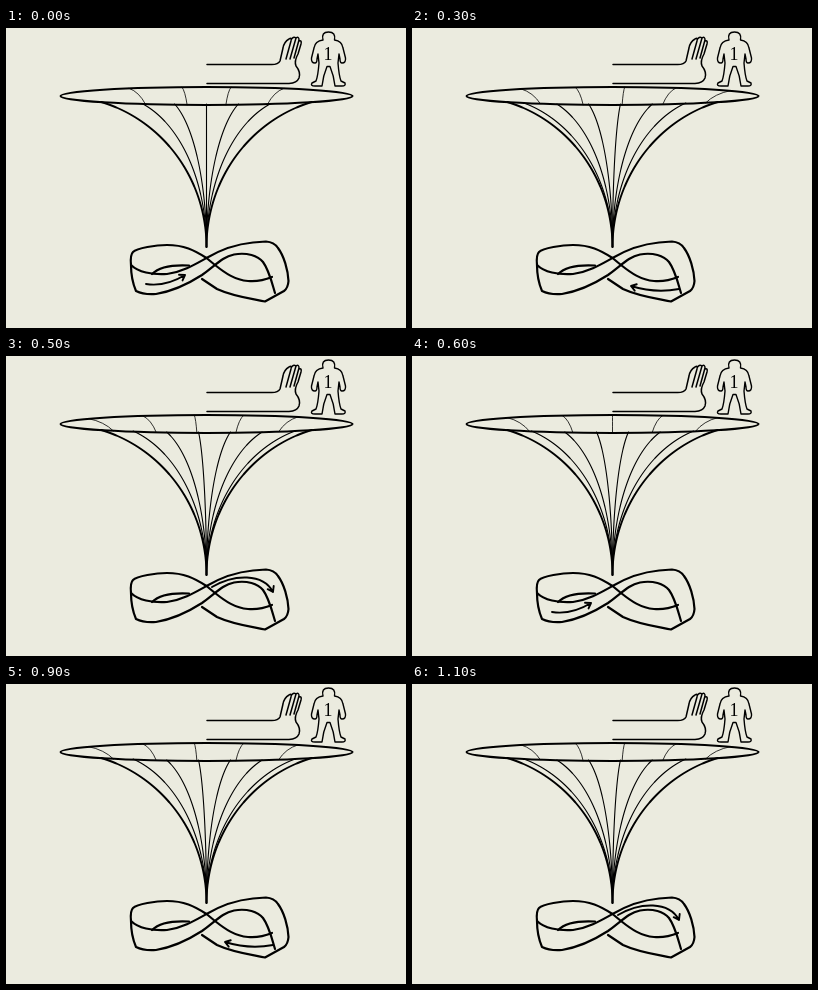
An HTML page with a canvas that plays this animation: 400 px wide and 300 px high, repeating every 1.2 s.

```html
<!DOCTYPE html>
<html lang="en">
<head>
<meta charset="utf-8">
<title>Funnel and band</title>
<style>
html, body { margin: 0; width: 100%; height: 100%; overflow: hidden; background: #ebebdf; }
canvas { display: block; }
</style>
</head>
<body>
<canvas id="stage" width="400" height="300"></canvas>
<script>
const ctx = document.getElementById('stage').getContext('2d');
const STEP = 100, LOOP = 1200;
const CX = 200.5, RIM_Y = 68, TIP_Y = 219, RX = 146, RY = 9;
const DEPTH = TIP_Y - RIM_Y;
const LINES = 13, GAP = Math.PI * 2 / LINES;

const band = [
  // left end and top, up to the crossing
  'M125 237Q124 227 127 224C131 220 150 217 161 217C178 217 188 222 200.5 230L209 237C219 245 229 252 242 253Q254 254 266 249',
  // upper edge of the front strand and the right end
  'M125 237C132 244 146 247 161 246C176 244 188 237 200.5 230C214 222 232 216 247 214.5L260 213.5Q268 214 272 220C278 228 282 242 282.5 253Q282 260 278 263L259 273.5C241 270 226 268 211 261L196 251',
  // lower edge of the front strand
  'M125 237C125 246 127 256 130 263Q138 267 150 266C168 263 182 256 196 247C210 237 216 229 228 226.5C241 224 252 228 257 234C263 242 266 255 269 265',
  'M146 246Q156 236 183 237.5'
].map(d => new Path2D(d));

const arm = new Path2D('M201 36.5L264 36.5Q272 37 274 33L277 20Q278 14 283 11Q286 9 285 13L280 31M285 12Q287 8 290 10L284 31M290 10Q293 8 293 12L288 30M293 13Q296 12 295 16L292 26Q288 33 290 38Q295 44 293 50Q291 55 283 55.5H201');

const person = new Path2D('M317 12Q315 4 322.5 4Q330 4 328.5 12Q336 13 337 20L339.5 30Q340 35 336 35Q334 35 334 31L333 26L332 35Q333 48 335 53L339 55Q340 58 336 58H329Q328 48 324 38.5H321Q317 48 316 58H309Q304 58 306 55L310 53Q312 48 313 35L312 26L311 31Q311 35 309 35Q305 35 305.5 30L308 20Q309 13 317 12Z');

// each arrow: start, two controls, tip
const arrows = [
  [140, 256, 153, 258, 166, 255, 179, 247],
  [166, 254, 184, 247, 196, 239, 210, 231],
  [193, 240, 205, 230, 220, 223, 238, 227],
  [267, 261, 251, 264, 235, 263, 219, 258],
  [181, 241, 167, 239, 154, 240, 143, 243],
  [206, 231, 228, 218, 257, 217, 267, 236]
];

function stroke(path, width) {
  ctx.lineWidth = width;
  ctx.stroke(path);
}

// half width of the funnel at height y
function halfWidth(y) {
  const v = (TIP_Y - y) / DEPTH;
  return RX * (1 - Math.sqrt(Math.max(0, 1 - v * v)));
}

// half height of the rim at x
function rimAt(x) {
  const u = (x - CX) / RX;
  return RY * Math.sqrt(Math.max(0, 1 - u * u));
}

function outerLine(s, width) {
  const p = new Path2D();
  let open = false;
  for (let y = 70; y <= TIP_Y; y++) {
    const x = CX + s * halfWidth(y);
    if (y < RIM_Y + rimAt(x) - 1) continue;
    if (open) p.lineTo(x, y);
    else p.moveTo(x, y);
    open = true;
  }
  stroke(p, width);
}

function innerLine(s) {
  const top = CX + s * RX, mid = CX + s * RX * 0.87, end = CX + s * RX * 0.79;
  const p = new Path2D();
  p.moveTo(top, RIM_Y - rimAt(top));
  p.quadraticCurveTo(mid, RIM_Y - rimAt(mid) + 4, end, RIM_Y + rimAt(end));
  stroke(p, 0.8);
}

function funnel(turn) {
  for (let i = 0; i < LINES; i++) {
    const a = i * GAP + turn, s = Math.sin(a), c = Math.cos(a);
    if (c < -0.4) innerLine(s / (1 + 0.45 * c * c));
    if (c > 0.2) outerLine(s / (1 + 0.5 * c), 1.1);
  }
  outerLine(-1, 1.9);
  outerLine(1, 1.9);
  const rim = new Path2D();
  rim.ellipse(CX, RIM_Y, RX, RY, 0, 0, Math.PI * 2);
  stroke(rim, 2);
}

function arrow([x0, y0, x1, y1, x2, y2, x, y]) {
  const a = Math.atan2(y - y2, x - x2);
  const p = new Path2D();
  p.moveTo(x0, y0);
  p.bezierCurveTo(x1, y1, x2, y2, x, y);
  const wing = d => [x - 6 * Math.cos(a + d), y - 6 * Math.sin(a + d)];
  p.moveTo(...wing(0.6));
  p.lineTo(x, y);
  p.lineTo(...wing(-0.6));
  stroke(p, 1.9);
}

function draw(now) {
  const n = Math.floor((now % LOOP) / STEP);
  ctx.fillStyle = '#ebebdf';
  ctx.fillRect(0, 0, 400, 300);
  ctx.strokeStyle = ctx.fillStyle = '#000';
  ctx.lineCap = ctx.lineJoin = 'round';
  stroke(arm, 1.5);
  stroke(person, 1.4);
  ctx.font = '18px "Liberation Serif", serif';
  ctx.textAlign = 'center';
  ctx.fillText('1', 322, 32);
  funnel(-n * GAP / 4);
  for (const p of band) stroke(p, 2.2);
  arrow(arrows[n % arrows.length]);
}

const start = performance.now();
function tick() {
  draw(performance.now() - start);
  requestAnimationFrame(tick);
}
tick();
</script>
</body>
</html>
```
